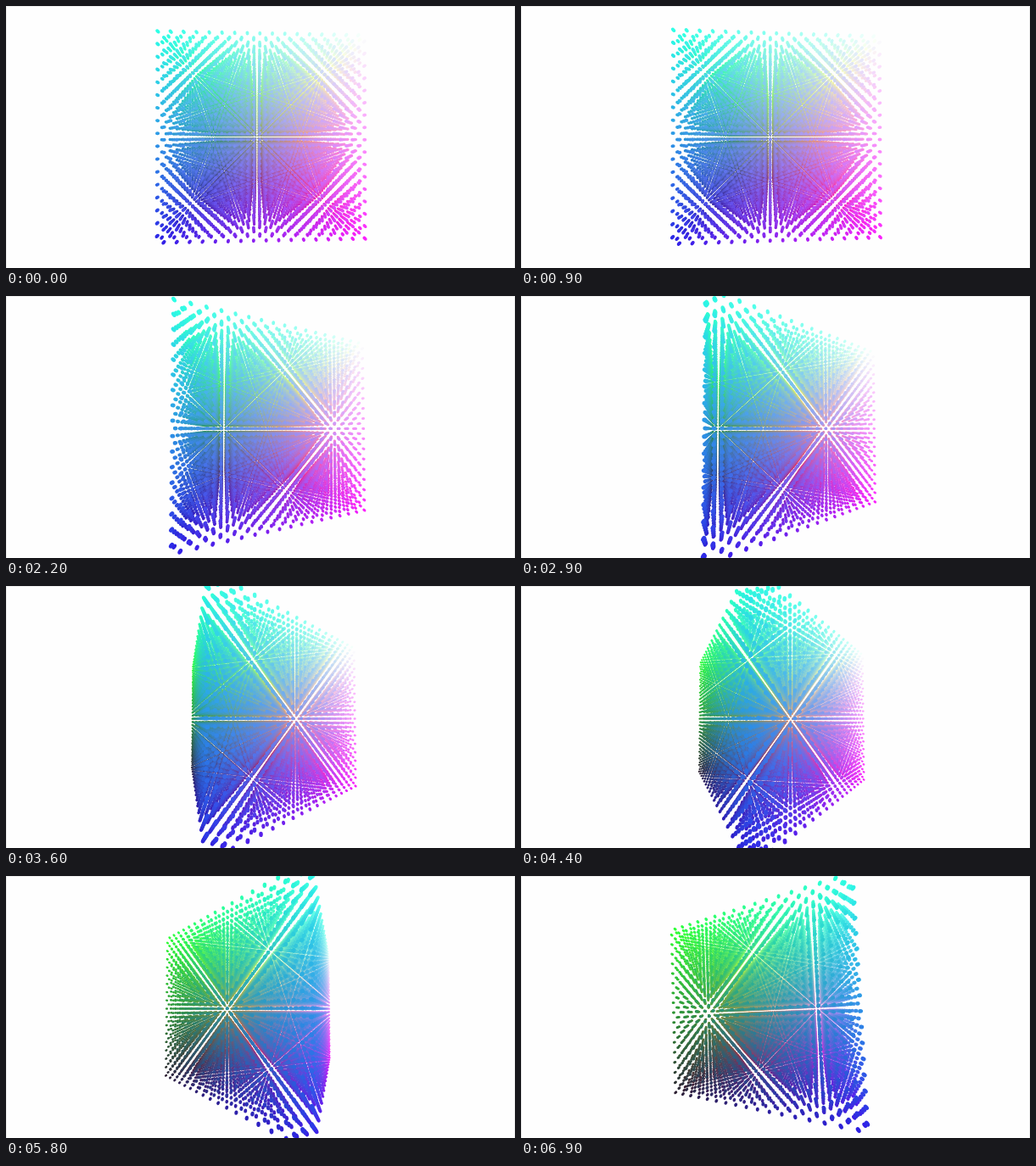
An HTML page with a canvas that plays this animation: 600x309 px, repeating every 7000 ms.

```html
<!DOCTYPE html>
<html lang="en">
<head>
<meta charset="utf-8">
<title>Colour cube</title>
<style>
  html, body { margin: 0; width: 100%; height: 100%; overflow: hidden; background: #fefefe; }
  canvas { display: block; width: 600px; height: 309px; }
</style>
</head>
<body>
<canvas id="stage" width="600" height="309"></canvas>
<script>
const W = 600, H = 309, LOOP = 7000, STEP = 100;
const N = 34;            // lattice layers per axis
const FOCAL = H / 2;     // 90 degree vertical field of view
const DIST = 2.265;      // camera distance in half edges
const RADIUS = 0.0162;
const ctx = document.getElementById('stage').getContext('2d');

// [time, degrees]
const YAW = [[0, 1.4], [800, 1.4], [1500, 7.74], [2900, 23.75], [3200, 26.6],
  [3700, 31], [3800, 31], [4400, 38.35], [4600, 41.7], [5200, 50.9],
  [5800, 59.2], [6200, 66], [6900, 72.4]];
const PITCH = [[0, 0.2], [800, 0.2], [1500, 0.9], [6200, 0.95], [6900, 1.4]];
const ROLL = [[0, 0], [6000, 0], [6900, 2.5]];

function angleAt(keys, t) {
  let deg = keys[keys.length - 1][1];
  for (let n = 1; n < keys.length; n++) {
    const [t0, a0] = keys[n - 1], [t1, a1] = keys[n];
    if (t <= t1) {
      deg = a0 + (a1 - a0) * (t - t0) / (t1 - t0);
      break;
    }
  }
  return deg * Math.PI / 180;
}

// Slightly softened RGB: lifted blacks, muted blue
function tint(r, g, b) {
  const red = 45 + 205 * r;
  const green = 32 + 223 * Math.pow(g, 0.9);
  const blue = 50 + 180 * b + 22 * r * b;
  return `rgb(${[red, green, blue].map(Math.round).join()})`;
}

// Face-centred lattice: every second site of a cubic grid
const points = [];
const unit = n => n / (N - 1);
for (let i = 0; i < N; i++)
  for (let j = 0; j < N; j++)
    for (let k = 0; k < N; k++) {
      if ((i + j + k) % 2 !== 0) continue;
      const r = unit(i), g = unit(j), b = unit(k);
      points.push({
        x: 2 * r - 1, y: 2 * g - 1, z: 2 * b - 1,
        color: tint(r, g, b), sx: 0, sy: 0, depth: 0
      });
    }

// Position relative to the middle of the stage
function project(p, yaw, pitch, roll) {
  const x = p.x * yaw.c + p.z * yaw.s;
  const z = p.z * yaw.c - p.x * yaw.s;
  const y = p.y * pitch.c + z * pitch.s;
  p.depth = DIST - (z * pitch.c - p.y * pitch.s);
  const scale = FOCAL / p.depth;
  p.sx = scale * (x * roll.c - y * roll.s);
  p.sy = -scale * (y * roll.c + x * roll.s);
}

// A sphere off the view axis appears stretched away from the centre
function drawDot(p) {
  const size = RADIUS * FOCAL / p.depth;
  const stretch = Math.hypot(1, p.sx / FOCAL, p.sy / FOCAL);
  ctx.fillStyle = p.color;
  ctx.beginPath();
  ctx.ellipse(W / 2 + p.sx, H / 2 + p.sy, size * stretch, size,
    Math.atan2(p.sy, p.sx), 0, 2 * Math.PI);
  ctx.fill();
}

const turn = a => ({ c: Math.cos(a), s: Math.sin(a) });

function draw(t) {
  const yaw = turn(angleAt(YAW, t));
  const pitch = turn(angleAt(PITCH, t));
  const roll = turn(angleAt(ROLL, t));
  for (const p of points) project(p, yaw, pitch, roll);
  points.sort((a, b) => b.depth - a.depth);

  ctx.fillStyle = '#fefefe';
  ctx.fillRect(0, 0, W, H);
  ctx.fillStyle = '#ececec';
  ctx.fillRect(0, 0, W, 1);
  ctx.fillRect(0, 0, 1, H);
  ctx.fillRect(W - 1, 0, 1, H);

  points.forEach(drawDot);
}

const start = performance.now();
let shown = -1;
function tick() {
  const t = Math.floor((performance.now() - start) % LOOP / STEP) * STEP;
  if (t !== shown) {
    shown = t;
    draw(t);
  }
  requestAnimationFrame(tick);
}
tick();
</script>
</body>
</html>
```
